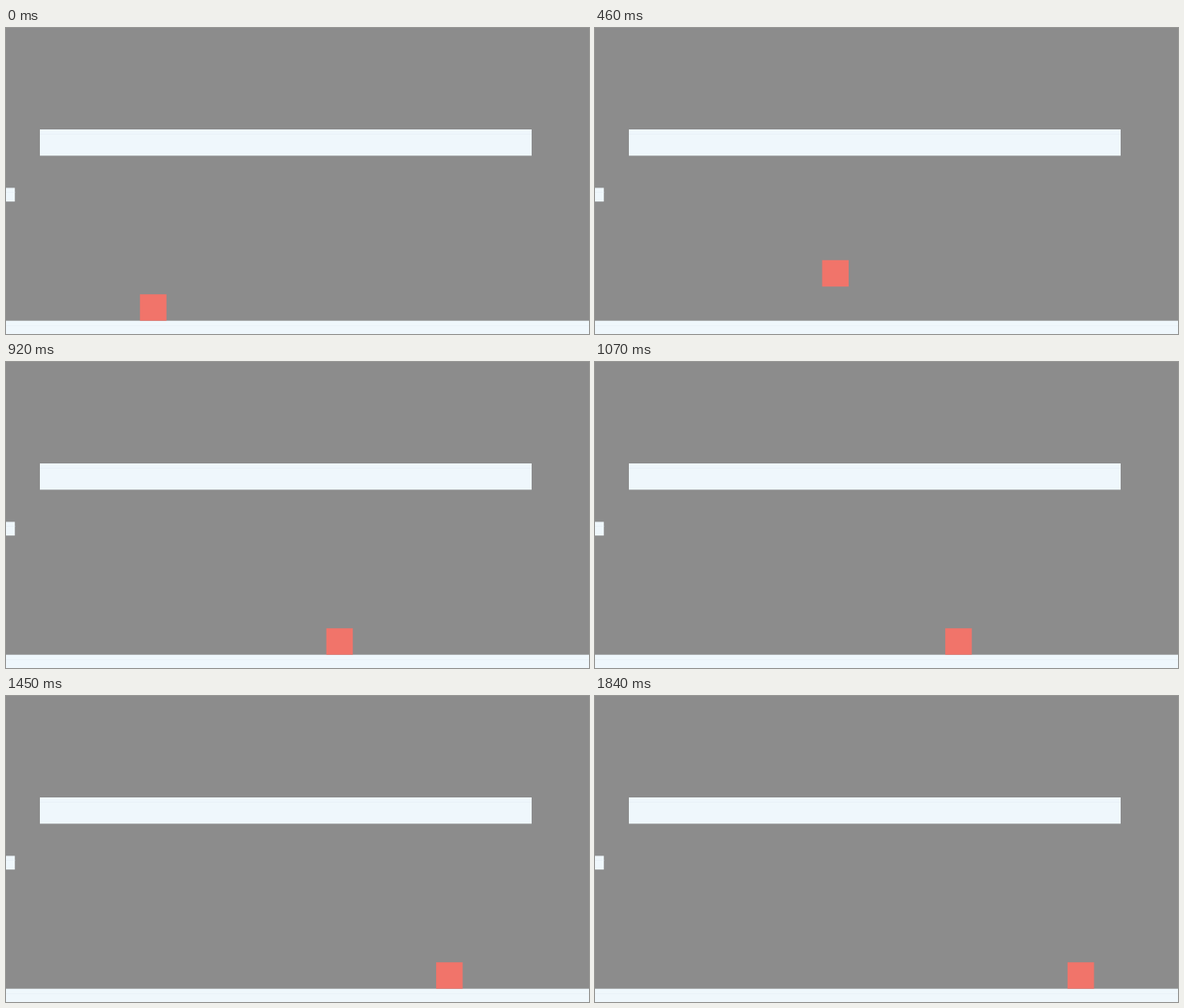
Write an HTML page with a canvas that moves like this. It is 671x353 px and loops after 1920 ms.

```html
<!DOCTYPE html>
<html lang="en">
<head>
<meta charset="utf-8">
<title>Jumping block</title>
<style>
  html, body { margin: 0; width: 100%; height: 100%; overflow: hidden; background: #8c8c8c; }
  canvas { display: block; }
</style>
</head>
<body>
<canvas id="stage" width="671" height="353"></canvas>
<script>
  const LOOP = 1920;
  const STEP = 230 / 3;    // ms between pictures
  const LEAD = 7;          // ms by which each picture comes early
  const START_X = 154.2, FLOOR = 307.2, SIZE = 30.5;
  const SPEED = 3.83;      // px per game tick
  const RUN_STEPS = 21;    // pictures until the block slows down
  const ctx = document.getElementById('stage').getContext('2d');

  // Whole game ticks pass between pictures, so the stride varies slightly.
  const ticks = step => Math.floor(4.69 * step + 0.13);

  function blockX(step) {
    const run = SPEED * ticks(Math.min(step, RUN_STEPS));
    const glide = 15.3 * (1 - 0.4 ** Math.max(0, step - RUN_STEPS));
    return START_X + run + glide;
  }

  // The jump is a parabola over x, cut off by the floor.
  const blockY = x => Math.min(FLOOR, 252.6 + 0.0144 * (x - 293.9) ** 2);

  function rect(color, x, y, w, h) {
    ctx.fillStyle = color;
    ctx.fillRect(x, y, w, h);
  }

  function bar(x, y, w, h) {
    rect('#eff7fc', x, y, w, h);
    rect('#eaf2f8', x, Math.round(y) + 5, w, 1);
  }

  function draw() {
    const t = performance.now() % LOOP;
    const x = blockX(Math.floor((t + LEAD) / STEP));
    rect('#8c8c8c', 0, 0, 671, 353);
    bar(39, 117, 566, 30.3);
    bar(0, 184.4, 10.2, 15.8);
    bar(0, 337.7, 671, 15.3);
    rect('#f1746a', x, blockY(x), SIZE, SIZE);
    requestAnimationFrame(draw);
  }
  draw();
</script>
</body>
</html>
```
